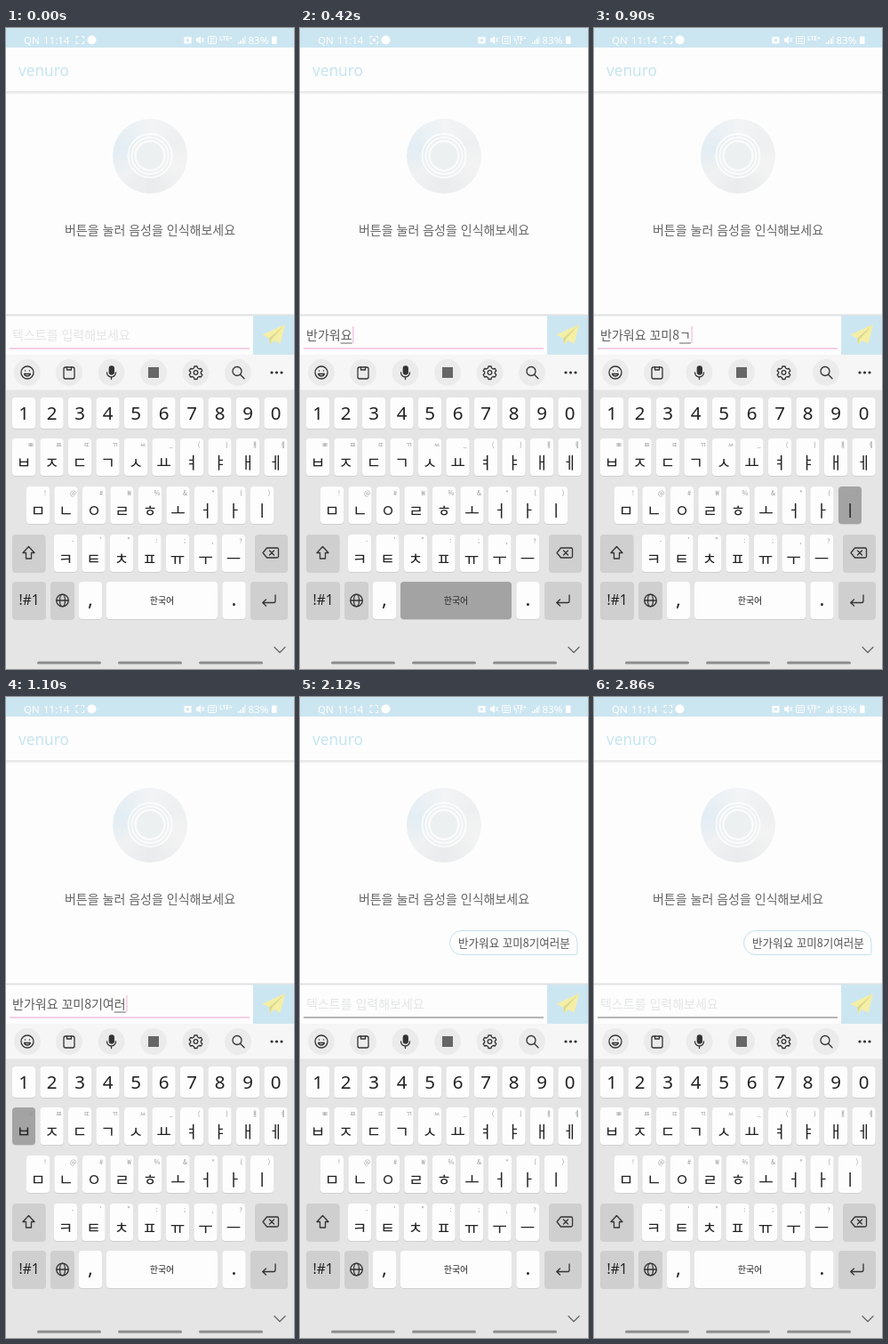
An HTML page for the animation above (2900 ms loop, 324 px wide and 720 px high).

```html
<!DOCTYPE html>
<html lang="ko">
<head>
<meta charset="utf-8">
<title>Chat keyboard</title>
<style>
  html, body { margin: 0; width: 100%; height: 100%; overflow: hidden; background: #fdfdfd; }
  svg { display: block; width: 324px; height: 720px; }
  text { font-family: "Noto Sans CJK KR", "Noto Sans CJK", sans-serif; white-space: pre; }
  .latin { font-family: "Noto Sans", sans-serif; }
  .line { fill: none; stroke: #333; stroke-width: 1.3; stroke-linecap: round; stroke-linejoin: round; }
  .disc { border-radius: 50%; width: 100%; height: 100%; }
</style>
</head>
<body>
<svg id="stage" viewBox="0 0 324 720" xmlns="http://www.w3.org/2000/svg">
  <defs>
    <linearGradient id="shade" x2="0" y2="1">
      <stop stop-color="#e2e2e2"/><stop offset="1" stop-color="#fdfdfd"/>
    </linearGradient>
    <filter id="soft"><feGaussianBlur stdDeviation=".7"/></filter>
  </defs>
  <rect width="324" height="720" fill="#fdfdfd"/>

  <rect width="324" height="22" fill="#cce6f1"/>
  <g fill="#fff" class="status">
    <text class="latin" x="20" y="17.5" font-size="11.5">QN</text>
    <text class="latin" x="42" y="17.5" font-size="11.5">11:14</text>
    <path d="M79 12v-2.500h2.500M85 9.500h2.500v2.500M87.500 15v2.500h-2.500M81.500 17.500h-2.500v-2.500" fill="none" stroke="#fff"/>
    <circle id="scanDot" cx="83.300" cy="13.500" r="1.800"/>
    <circle cx="96.500" cy="13.500" r="5"/>
    <path d="M200.500 10h8v7.500h-8zM203 12.200v3h3v-3z" fill-rule="evenodd"/>
    <path d="M214 11.500h2l3-2.500v9l-3-2.500h-2z"/>
    <path d="M220 11l3 5M223 11l-3 5" stroke="#fff"/>
    <rect x="227.500" y="9.500" width="9" height="8" rx="1" fill="none" stroke="#fff"/>
    <path d="M229 12h6M229 15h6" stroke="#fff"/>
    <text class="latin" x="240" y="13.500" font-size="6.500" font-weight="700">LTE+</text>
    <path id="arrows" d="M243.500 18v-3.500M248 14.500v3.500" stroke="#fff"/>
    <path d="M261 18v-2h1.500v2zM263.500 18v-4h1.500v4zM266 18v-6.500h1.500v6.500zM268.500 18v-9h.8v9z"/>
    <text class="latin" x="272.500" y="17.500" font-size="11.500">83%</text>
    <rect x="299" y="9.500" width="5.500" height="8.500" rx="1"/>
  </g>

  <text class="latin" x="14" y="54" font-size="17.2" fill="#c6e5f0">venuro</text>
  <rect y="71" width="324" height="4" fill="url(#shade)"/>

  <g id="button">
    <g filter="url(#soft)">
      <foreignObject x="120" y="101.500" width="84" height="84"><div class="disc" id="disc"></div></foreignObject>
    </g>
    <g id="rings" fill="none" stroke="#fff">
      <circle cx="162" cy="143.500" r="24.500" stroke-width="2"/>
      <circle cx="162" cy="143.500" r="20.500" stroke-width="2"/>
      <circle cx="162" cy="143.500" r="16.500" stroke-width="2.500"/>
    </g>
  </g>
  <text id="caption" x="162" y="232" font-size="14" text-anchor="middle" fill="#666"></text>

  <g id="bubble">
    <path d="M182 262.500H298.500a13.500 13.500 0 0 1 13.500 13.500V287a2.500 2.500 0 0 1-2.500 2.500H182a13.500 13.500 0 0 1 0-27Z" fill="#fdfdfd" stroke="#c4e1ee"/>
    <text x="178" y="281" font-size="12.550" fill="#555">반가워요 꼬미8기여러분</text>
  </g>

  <rect y="321.500" width="324" height="2" fill="#dfe1e2"/>
  <text id="placeholder" x="7" y="350" font-size="14" fill="#e4e5e6">텍스트를 입력해보세요</text>
  <text id="typed" x="7" y="350" font-size="14" fill="#5c5c5c"></text>
  <rect id="composing" y="353.500" height="1" fill="#666"/>
  <rect id="cursor" y="335" width="1.500" height="19" fill="#f4cbe4"/>
  <rect id="underline" x="4" width="270"/>
  <rect x="278" y="323" width="46" height="44" fill="#cce6f1"/>
  <path d="M314 333L288.500 344.500L296 348.500L297.500 355.500L301.500 351L308.500 354.500Z" fill="#f4efa5"/>
  <path d="M314 333L296 348.500L297.500 355.500L299 349.500Z" fill="#dcd98f"/>

  <rect y="367" width="324" height="40" fill="#f6f6f6"/>
  <rect y="406.500" width="324" height="313.500" fill="#e5e5e6"/>
  <g id="toolbar" fill="#ebebeb"></g>
  <g class="line">
    <circle cx="24" cy="387" r="7"/>
    <path d="M20.500 388.500a3.700 3.700 0 0 0 7 0zM21.500 385h.1M26.500 385h.1"/>
    <rect x="65" y="381" width="12" height="13" rx="2"/><path d="M68.500 381v3h5v-3"/>
    <rect x="116.300" y="380" width="5" height="9" rx="2.500" fill="#333"/>
    <path d="M113.500 387a5 5 0 0 0 10 0M118.500 392v2.500"/>
    <circle cx="213.500" cy="387" r="2.300"/>
    <path d="M212 380h3l.6 2 1.700 1 2.100-.5 1.400 2.500-1.500 1.500v1.500l1.500 1.500-1.400 2.500-2.100-.5-1.700 1-.6 2h-3l-.6-2-1.700-1-2.100.5-1.400-2.500 1.500-1.500v-1.500l-1.500-1.500 1.400-2.500 2.100.5 1.700-1z"/>
    <circle cx="260" cy="385.500" r="5"/><path d="M263.700 389.500l4.300 4.300"/>
    <path d="M302 695.500l6 6 6-6" stroke="#666"/>
  </g>
  <rect x="160" y="381" width="12" height="12" fill="#666"/>
  <g fill="#333"><circle cx="299" cy="387" r="1.600"/><circle cx="304.500" cy="387" r="1.600"/><circle cx="310" cy="387" r="1.600"/></g>

  <g id="keys"></g>
  <g class="line" stroke-width="1.300">
    <path d="M25.500 582.500l-6.500 7h3.500v6.500h6v-6.500h3.500z"/>
    <path d="M293.500 584h11.500a1.500 1.500 0 0 1 1.500 1.500v8a1.500 1.500 0 0 1-1.500 1.500h-11.500l-4.500-5.500zM296.500 587l5 5M301.500 587l-5 5"/>
    <circle cx="63.500" cy="643" r="6.800"/>
    <ellipse cx="63.500" cy="643" rx="3" ry="6.800"/><path d="M57 643h13"/>
    <path d="M303 637v6.500a2 2 0 0 1-2 2h-12M292.500 642l-3.800 3.500 3.800 3.500"/>
  </g>
  <g fill="#8d8d8e">
    <rect x="35" y="711.500" width="72" height="3" rx="1.500"/>
    <rect x="126" y="711.500" width="72" height="3" rx="1.500"/>
    <rect x="217" y="711.500" width="72" height="3" rx="1.500"/>
  </g>
</svg>
<script>
const LOOP = 2900, SEND = 1260, SPEAK_START = 2170, SPEAK_END = 2710;
const PITCH = 31.5, WHITE = '#fdfdfd', GRAY = '#cfcfd0', PRESSED = '#a3a3a3';
const $ = id => document.getElementById(id);

function add(parent, tag, attrs, content) {
  const node = document.createElementNS('http://www.w3.org/2000/svg', tag);
  for (const name in attrs) node.setAttribute(name, attrs[name]);
  if (content) node.textContent = content;
  return parent.appendChild(node);
}

const keys = {};
function addKey(name, x, y, width, height = 42, fill = WHITE) {
  const box = { x, width, height, rx: 4 };
  add($('keys'), 'rect', { ...box, y: y + 1, fill: '#d0d0d1' });
  const rect = add($('keys'), 'rect', { ...box, y, fill });
  return keys[name] = { rect, fill };
}
function addLabel(text, x, y, size, fill = '#222', cls = '') {
  return add($('keys'), 'text', { x, y, 'font-size': size, 'text-anchor': 'middle', fill, class: cls }, text);
}
function addRow(letters, hints, x, y) {
  [...letters].forEach((letter, i) => {
    const left = x + i * PITCH;
    const key = addKey(letter, left, y, 26);
    key.label = addLabel(letter, left + 13, y + 34, 18);
    addLabel(hints[i], left + 21, y + 10, 7.5, '#999');
  });
}

[24, 71, 118.5, 166, 213.5, 261].forEach(cx => add($('toolbar'), 'circle', { cx, cy: 387, r: 15 }));
[...'1234567890'].forEach((digit, i) => {
  addKey(digit, 7 + i * PITCH, 415, 26, 35);
  addLabel(digit, 20 + i * PITCH, 440, 20.5, '#222', 'latin');
});
addRow('ㅂㅈㄷㄱㅅㅛㅕㅑㅐㅔ', 'ㅃㅉㄸㄲㅆ_()ㅒㅖ', 7, 461);
addRow('ㅁㄴㅇㄹㅎㅗㅓㅏㅣ', '!@#₩%&*()', 23, 515);
addRow('ㅋㅌㅊㅍㅠㅜㅡ', '-\'":;,?', 54, 569);
addKey('shift', 7, 569, 37.5, 42, GRAY);
addKey('delete', 280, 569, 37, 42, GRAY);
addKey('symbols', 7, 622, 38, 42, GRAY);
addKey('globe', 50, 622, 27, 42, GRAY);
addKey(',', 82, 622, 26);
addKey('space', 113, 622, 125);
addKey('.', 243.5, 622, 26);
addKey('enter', 275, 622, 42, 42, GRAY);
addLabel('!#1', 26, 648, 15.5, '#222', 'latin');
addLabel(',', 95, 649, 22, '#222', 'latin');
addLabel('.', 256.5, 649, 22, '#222', 'latin');
addLabel('한국어', 175.5, 647, 10);

// [press time, key, text once the key lands]
const strokes = [
  [20, 'ㅂ', 'ㅂ'], [60, 'ㅏ', '바'], [100, 'ㄴ', '반'], [140, 'ㄱ', '반ㄱ'],
  [180, 'ㅏ', '반가'], [220, 'ㅇ', '반강'], [260, 'ㅜ', '반가우'], [300, 'ㅓ', '반가워'],
  [340, 'ㅇ', '반가웡'], [380, 'ㅛ', '반가워요'], [420, 'space', '반가워요 '],
  [460, 'shift', '반가워요 '], [500, 'ㄱ', '반가워요 ㄲ'], [540, 'ㅗ', '반가워요 꼬'],
  [620, 'ㅁ', '반가워요 꼼'], [680, 'ㅣ', '반가워요 꼬미'], [760, '8', '반가워요 꼬미8'],
  [840, 'ㄱ', '반가워요 꼬미8ㄱ'], [900, 'ㅣ', '반가워요 꼬미8기'], [940, 'ㅇ', '반가워요 꼬미8깅'],
  [980, 'ㅕ', '반가워요 꼬미8기여'], [1020, 'ㄹ', '반가워요 꼬미8기열'],
  [1060, 'ㅓ', '반가워요 꼬미8기여러'], [1100, 'ㅂ', '반가워요 꼬미8기여럽'],
  [1140, '', '반가워요 꼬미8기여러부'], [1180, '', '반가워요 꼬미8기여러분']
];
const doubles = { ㅂ: 'ㅃ', ㅈ: 'ㅉ', ㄷ: 'ㄸ', ㄱ: 'ㄲ', ㅅ: 'ㅆ', ㅐ: 'ㅒ', ㅔ: 'ㅖ' };
const between = (t, start, end) => t >= start && t < end;
const show = (id, visible) => { $(id).style.display = visible ? '' : 'none'; };

function drawInput(t) {
  const landed = strokes.filter(([time]) => t >= time + 20);
  const text = t < SEND && landed.length ? landed[landed.length - 1][2] : '';
  $('typed').textContent = text;
  show('placeholder', !text);
  show('cursor', text);
  const open = text && /[ㄱ-ㅎ가-힣]$/.test(text);
  show('composing', open);
  if (text) {
    const width = $('typed').getComputedTextLength();
    $('cursor').setAttribute('x', 7.5 + width);
    if (open) {
      const last = $('typed').getSubStringLength(text.length - 1, 1);
      $('composing').setAttribute('x', 7 + width - last);
      $('composing').setAttribute('width', last);
    }
  }
  const focused = t < SEND;
  $('underline').setAttribute('y', focused ? 359 : 359.5);
  $('underline').setAttribute('height', focused ? 2 : 1);
  $('underline').setAttribute('fill', focused ? '#f3d0e6' : '#707070');
}

function drawKeys(t) {
  const stroke = strokes.find(([time]) => between(t, time, time + 30));
  const shifted = between(t, 480, 520);
  for (const name in keys) {
    const key = keys[name];
    key.rect.setAttribute('fill', stroke && stroke[1] === name ? PRESSED : key.fill);
    if (doubles[name]) key.label.textContent = shifted ? doubles[name] : name;
  }
}

function drawButton(t) {
  const speaking = between(t, SPEAK_START, SPEAK_END);
  const phase = (t - 2480) / (SPEAK_END - SPEAK_START);
  const scale = speaking ? 1.01 + 0.025 * Math.cos(phase * Math.PI * 4) : 1;
  $('disc').style.background = speaking
    ? `radial-gradient(circle, #bfe0a5 36%, transparent 40%),
       conic-gradient(from ${phase * 360}deg, #d9e891, #cde5b0 50deg, #e2eecd 110deg, #bfe0a4 180deg, #d3e58f 235deg, #f2ee70 290deg, #d9e891)`
    : `radial-gradient(circle, #edf0f1 36%, transparent 40%),
       conic-gradient(#f2f4f5, #eeeff0 60deg, #f3f3f3 110deg, #e9ebec 180deg, #f0f1f2 235deg, #e2edf4 285deg, #f2f4f5)`;
  $('rings').setAttribute('opacity', speaking ? 0.95 : 0.75);
  $('button').setAttribute('transform', `translate(162 143.5) scale(${scale}) translate(-162 -143.5)`);
  $('caption').textContent = speaking ? '음성을 발화하는 중입니다.' : '버튼을 눌러 음성을 인식해보세요';
}

function draw(t) {
  drawInput(t);
  drawKeys(t);
  drawButton(t);
  show('bubble', t >= SEND + 20);
  show('scanDot', between(t, 300, 520));
  show('arrows', between(t, 300, 520) || t >= 1660);
}

function tick() {
  draw(performance.now() % LOOP);
  requestAnimationFrame(tick);
}
tick();
</script>
</body>
</html>
```
